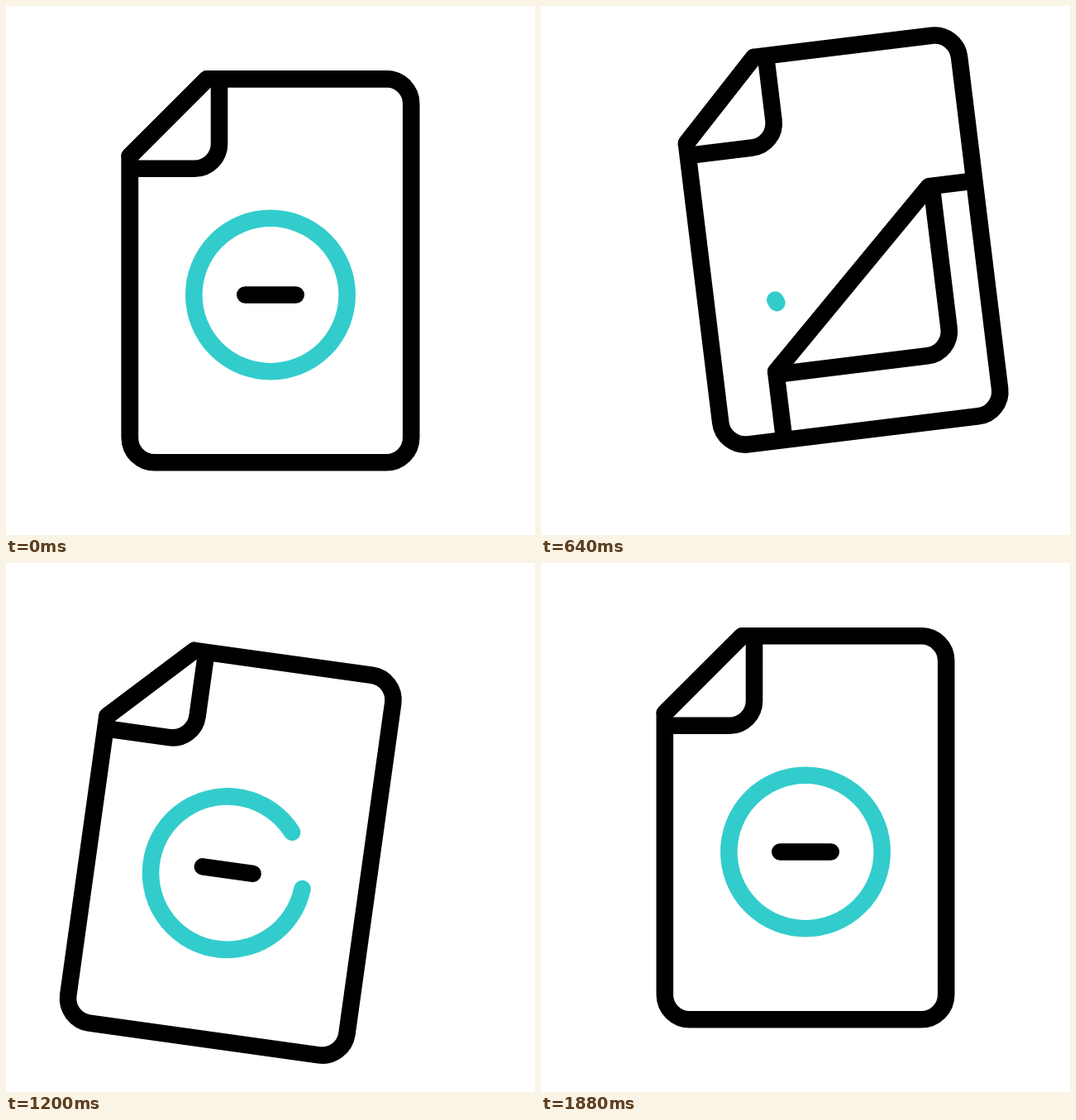
An HTML page with a canvas that plays this animation: 640x640 px, repeating every 2 s.

```html
<!DOCTYPE html>
<html lang="en">
<head>
<meta charset="utf-8">
<title>Document minus</title>
<style>
  html, body { margin: 0; width: 100%; height: 100%; overflow: hidden; background: #fff; }
  canvas { display: block; width: 100vw; height: 100vh; }
</style>
</head>
<body>
<canvas id="stage" width="640" height="640"></canvas>
<script>
const ctx = document.getElementById('stage').getContext('2d');
const LOOP = 2000, STEP = 40;
const INK = '#000', TEAL = '#33cccc', PAPER = '#fff', LINE = 20.6;
const LEFT = 149.8, RIGHT = 490.2, TOP = 88.3, BOTTOM = 552.3, R = 30;
const CX = 320, CY = 320.3, RING_Y = 349.5, RING_R = 92.7;

// Page sway: time span, start and end pose [x, y, degrees], bow of the path
const REST = [0, 0, 0], BACK = [42.3, -38, -7.1], FORTH = [-48.7, 26.1, 8];
const SWAY = [
  { from: 200, to: 720, a: REST, b: BACK, bow: [1.8, 1.1, 0] },
  { from: 720, to: 1240, a: BACK, b: FORTH, bow: [4.3, 5.5, 0] },
  { from: 1265, to: 1890, a: FORTH, b: REST, bow: [0.9, 2.1, 0] }
];
// Length of the new ring in degrees
const GROW = [[600, 0], [640, 2.5], [960, 148], [1200, 316], [1320, 360]];

const clamp = v => Math.min(1, Math.max(0, v));
const span = (t, from, to) => clamp((t - from) / (to - from));
const mix = (a, b, p) => a + (b - a) * p;

// cubic-bezier(.4, 0, .3, 1)
function ease(u) {
  if (u <= 0 || u >= 1) return clamp(u);
  let lo = 0, hi = 1, s = 0.5;
  for (let i = 0; i < 24; i++) {
    s = (lo + hi) / 2;
    const x = 1.2 * (1 - s) ** 2 * s + 0.9 * (1 - s) * s * s + s ** 3;
    if (x < u) lo = s; else hi = s;
  }
  return s * s * (3 - 2 * s);
}

function pose(t) {
  let seg = SWAY[0];
  for (const s of SWAY) if (t >= s.from) seg = s;
  const p = ease(span(t, seg.from, seg.to));
  return seg.a.map((v, i) => mix(v, seg.b[i], p) + 4 * p * (1 - p) * seg.bow[i]);
}

// Smooth curve through keys, flat at both ends
function curve(keys, t) {
  const last = keys.length - 1;
  if (t <= keys[0][0]) return keys[0][1];
  if (t >= keys[last][0]) return keys[last][1];
  const i = keys.findIndex(k => k[0] > t) - 1;
  const slope = n => n <= 0 || n >= last ? 0 :
    (keys[n + 1][1] - keys[n - 1][1]) / (keys[n + 1][0] - keys[n - 1][0]);
  const slow = n => n === 1 ? 0.12 : slope(n);
  const [t0, v0] = keys[i], [t1, v1] = keys[i + 1];
  const d = t1 - t0, u = (t - t0) / d, w = 1 - u;
  return v0 * (1 + 2 * u) * w * w + slow(i) * d * u * w * w +
    v1 * u * u * (3 - 2 * u) - slow(i + 1) * d * u * u * w;
}

function stroke(path, color = INK, cap = 'butt') {
  ctx.strokeStyle = color;
  ctx.lineCap = cap;
  ctx.stroke(path);
}

function fill(path) {
  ctx.fillStyle = PAPER;
  ctx.fill(path);
}

function poly(...pts) {
  const path = new Path2D();
  pts.forEach(([x, y], i) => i ? path.lineTo(x, y) : path.moveTo(x, y));
  return path;
}

function bar(x0, x1, y) {
  stroke(poly([CX + x0, RING_Y + y], [CX + x1, RING_Y + y]), INK, 'round');
}

function ring(start, length) {
  const path = new Path2D(), rad = Math.PI / 180;
  path.arc(CX, RING_Y, RING_R, start * rad, (start + length) * rad);
  stroke(path, TEAL, 'round');
}

function clipped(path, draw) {
  ctx.save();
  ctx.clip(path);
  draw();
  ctx.restore();
}

// Fold state u: 0 = resting corner, 1 = page fully turned away
function fold(u) {
  const p = u * u * (3 - 2 * u);
  return {
    left: mix(LEFT, RIGHT, 0.31 * u ** 1.2 + 0.69 * u ** 10),
    top: mix(TOP, BOTTOM, 0.8 * u * u + 0.2 * u ** 10),
    vx: mix(243.3, RIGHT, p), vy: mix(181.6, BOTTOM, p),
    fx: mix(258, RIGHT, p), fy: mix(196.7, BOTTOM, p)
  };
}

function flap({ left, top, vx, vy, fx, fy }) {
  const r = Math.max(0, Math.min(R, fx - left, fy - top));
  const edge = new Path2D();
  edge.moveTo(fx, top);
  edge.arcTo(fx, fy, left, fy, r);
  edge.lineTo(left, fy);
  const area = new Path2D(edge);
  area.lineTo(left, vy);
  area.lineTo(vx, top);
  area.closePath();
  fill(area);
  stroke(edge);
  stroke(poly([vx, top], [left, vy]), INK, 'round');
}

const outline = new Path2D();
outline.moveTo(243.3, TOP);
outline.arcTo(RIGHT, TOP, RIGHT, BOTTOM, R);
outline.arcTo(RIGHT, BOTTOM, LEFT, BOTTOM, R);
outline.arcTo(LEFT, BOTTOM, LEFT, TOP, R);
outline.lineTo(LEFT, 181.6);
outline.closePath();

const silhouette = new Path2D();
silhouette.roundRect(LEFT - LINE / 2, TOP - LINE / 2,
  RIGHT - LEFT + LINE, BOTTOM - TOP + LINE, [0, 40.3, 40.3, 40.3]);

const disc = new Path2D();
disc.arc(CX, RING_Y, RING_R, 0, 2 * Math.PI);

function newSign(t) {
  const y = mix(-110, 0, ease(span(t, 800, 1300)));
  if (t >= 800) clipped(disc, () => bar(-30.7, 30.7, y));
  const length = curve(GROW, t);
  const middle = 180 - 450 * span(t, 605, 1313);
  if (length > 0.5) ring(middle - length / 2, length);
}

function oldSign(t) {
  ring(0, 360);
  const x0 = mix(-30.7, 72.3, ease(span(t, 280, 680)));
  const x1 = mix(30.7, 72.3, ease(span(t, 200, 480)));
  if (x1 - x0 > 1) bar(x0, x1, 0);
}

function frontPage(t, u) {
  const f = fold(u), { left, top, vx, vy } = f;
  const area = poly([vx, top], [RIGHT, top], [RIGHT, BOTTOM], [left, BOTTOM], [left, vy]);
  fill(area);
  clipped(area, () => oldSign(t));
  stroke(poly([RIGHT, top], [vx, top], [left, vy], [left, BOTTOM]));
  flap(f);
}

function draw(t) {
  ctx.setTransform(1, 0, 0, 1, 0, 0);
  ctx.fillStyle = PAPER;
  ctx.fillRect(0, 0, 640, 640);
  const [x, y, angle] = pose(t);
  ctx.translate(CX + x, CY + y);
  ctx.rotate(angle * Math.PI / 180);
  ctx.translate(-CX, -CY);
  ctx.lineWidth = LINE;
  ctx.lineJoin = 'round';

  fill(outline);
  flap(fold(0));
  newSign(t);
  const u = span(t, 360, 764);
  if (u < 1 && t < 1400) clipped(silhouette, () => frontPage(t, u));
  stroke(outline);
}

function tick() {
  const t = performance.now() % LOOP;
  draw(Math.floor(t / STEP) * STEP);
  requestAnimationFrame(tick);
}
tick();
</script>
</body>
</html>
```
